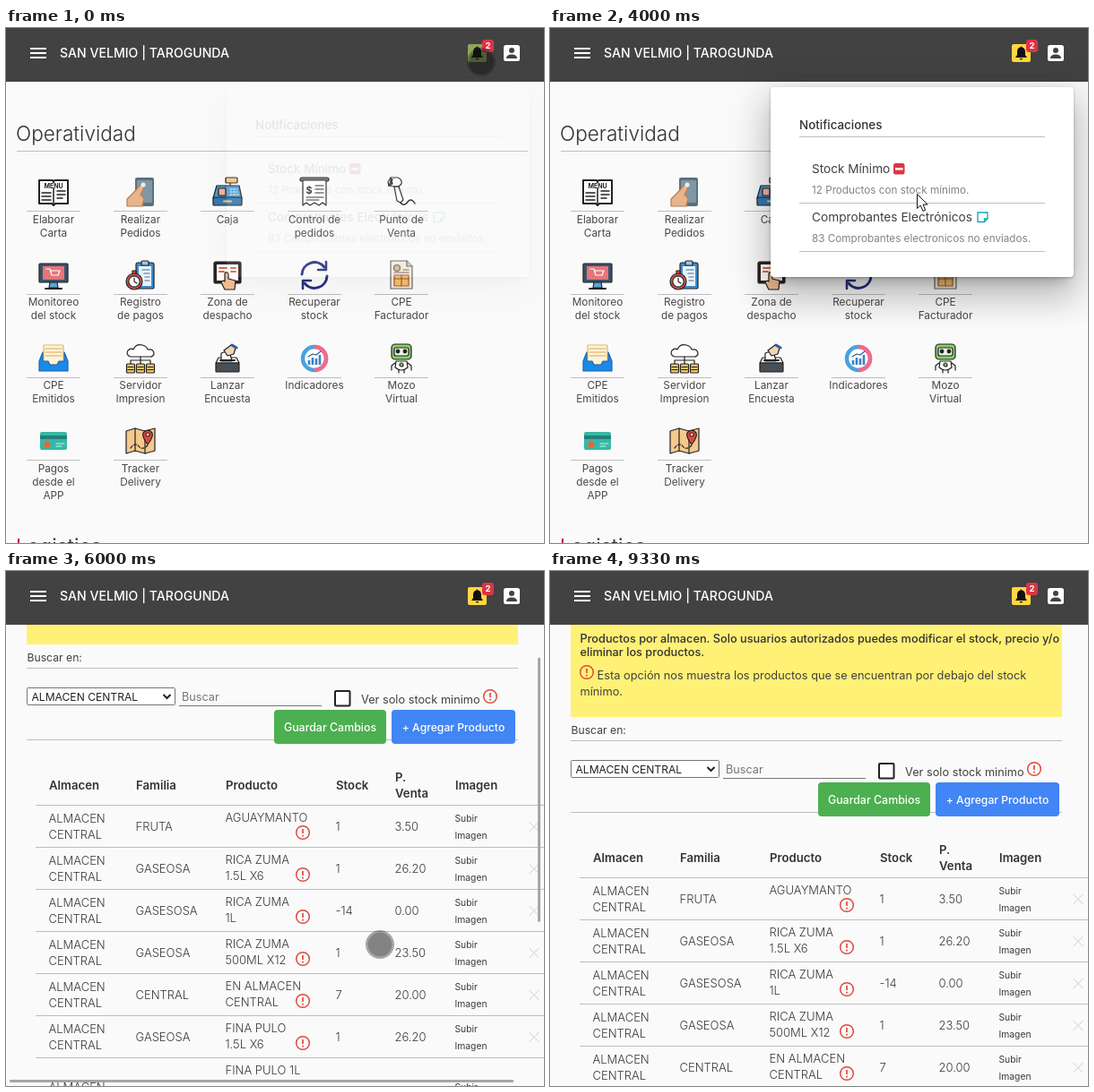
Recreate the animation shown at these times as an HTML page. Size 600 by 575 pixels, loop 9.39 s.

```html
<!DOCTYPE html>
<html lang="es">
<head>
<meta charset="utf-8">
<title>Notificaciones de stock</title>
<style>
  html, body { margin: 0; width: 100%; height: 100%; overflow: hidden; background: #fafafa; }
  svg { display: block; }
  text { font-family: Inter, Roboto, sans-serif; stroke: none; white-space: pre; }
  .icon { stroke: #222; stroke-width: 1.2; stroke-linejoin: round; stroke-linecap: round; }
</style>
</head>
<body>
<svg id="stage" width="600" height="575" viewBox="0 0 600 575"></svg>
<script>
const LOOP = 9390, STEP = 1000 / 15;

// Markup helpers
const text = (x, mid, str, size, fill = '#404040', weight = 400, anchor = 'start') =>
  `<text x="${x}" y="${mid + size * .36}" font-size="${size}" fill="${fill}" font-weight="${weight}" text-anchor="${anchor}">${str}</text>`;
const rect = (x, y, w, h, fill, rx = 0, extra = '') =>
  `<rect x="${x}" y="${y}" width="${w}" height="${h}" fill="${fill}" rx="${rx}" ${extra}/>`;
const circ = (x, y, r, fill, extra = '') => `<circle cx="${x}" cy="${y}" r="${r}" fill="${fill}" ${extra}/>`;
const path = (d, fill = 'none', extra = '') => `<path d="${d}" fill="${fill}" ${extra}/>`;
const rule = (x1, x2, y, color = '#bdbdbd') => rect(x1, y, x2 - x1, 1, color);
const group = (id, body) => `<g id="${id}">${body}</g>`;
const at = (x, y, body, cls = '') => `<g transform="translate(${x} ${y})" class="${cls}">${body}</g>`;
const plain = 'stroke="none"';
const alertIcon = (x, y) => at(x, y,
  circ(0, 0, 7.3, 'none', 'stroke="#e0483e" stroke-width="1.5"') +
  path('M0-4V1M0 2.8V4.4', 'none', 'stroke="#e0483e" stroke-width="1.7"'));

// Home icons, drawn around their own centre
const server = x => rect(x - 4.5, 6, 9, 10, '#e9c46a', 1) + path(`M${x - 3} 9.5h6M${x - 3} 12.5h6`);
const icons = {
  menu: path('M-16-13H-2Q0-13 0-11Q0-13 2-13H16V13H2L0 15L-2 13H-16Z', '#fff', 'stroke-width="2"') +
    path('M0-4V14M-13 1H-3M-13 5H-3M-13 9H-3M4-1h9M4 3h9M4 7h6', 'none', 'stroke-width="1.5"') +
    text(0, -7, 'MENU', 7, '#222', 700, 'middle'),
  phone: rect(-6, -16, 21, 32, '#5d6f7e', 2, plain) + rect(-4, -13, 17, 25, '#7f97a6', 0, plain) +
    path('M-15 8L-5-2Q0-9 2-8Q5-6 3-3L0 3L4 7L2 16H-15Z', '#e9b48c', 'stroke="#b77d58"') +
    circ(3, -8, 2.6, '#e7eef2', plain),
  register: rect(-2, -16, 13, 6, '#f2c879', 1) + path('M3-10V-6') +
    path('M-12-7H13L16 7H-16Z', '#4d9bd5') + rect(-16, 6, 32, 9, '#3878ae', 1) +
    rect(-10, -4, 8, 8, '#f3b2a0') + path('M3-3h8M3 0h8M3 3h9', 'none', 'stroke="#fff" stroke-dasharray="2 1.6"') +
    path('M-4 10.5H4', 'none', 'stroke="#f2c879" stroke-width="2"'),
  receipt: rect(-16, -16, 32, 4, '#777', 2) +
    path('M-13-13H13V15L9 12L5 15L0 12L-5 15L-9 12L-13 15Z', '#fff') +
    path('M1-7H10M1-3H10M1 1H10M-9 6H10M-9 9H5') + text(-6, -2, '$', 11, '#222', 600, 'middle'),
  scanner: path('M-15-11L-12-16H-4Q1-14 0-9L-3-6L2 9L-1 12L-5 10L-8-6L-14-7Z', '#fff') +
    path('M-14-7L-10-14M-8-6L-3-6M-1 12Q3 17 7 11Q11 6 15 13', 'none', 'stroke-width="1.5"') +
    path('M-12-16L-10-9L-14-7', '#444'),
  monitor: rect(-16, -13, 32, 21, '#38536b', 1) + rect(-12, -10, 24, 15, '#e8747a', 0, plain) +
    path('M-8-7h4l2 7h7l2-5h-10', 'none', 'stroke="#fff"') +
    path('M-4 8H4L5 14H-5Z', '#5ba5d5') + path('M-9 15H9', 'none', 'stroke-width="2"'),
  payments: rect(-5, -14, 20, 29, '#3e8cd0', 2) + rect(-2, -10, 14, 22, '#eaf3fa', 0, plain) +
    rect(1, -16, 8, 5, '#9cc7e8', 1) + path('M2-6h8M4-2h6M5 2h5M5 6h5', 'none', 'stroke="#3e6f9c"') +
    rect(-9, -5, 4, 4, '#d84f4f') + circ(-7, 7, 9, '#d84f4f') + circ(-7, 7, 6.2, '#fff') + path('M-7 3V7l3 2'),
  tablet: rect(-15, -15, 30, 24, '#2d2424', 2) + rect(-12, -12, 24, 18, '#fff', 0, plain) +
    path('M-9-8h8M-9-4h5M4-8h5M4-4h5', 'none', 'stroke="#d46b3a" stroke-width="2"') +
    path('M-3-2Q0-5 1-1V4L9 6L8 16H-3L-7 8Q-6 5-3 7Z', '#f3bd91'),
  refresh: path('M-14-1A14 14 0 0 1 11-9M14 1A14 14 0 0 1-11 9', 'none', 'stroke="#27307f" stroke-width="3"') +
    path('M13-15V-6H4M-13 15V6H-4', 'none', 'stroke="#27307f" stroke-width="2.5"'),
  invoice: path('M-12-16H6L12-10V15H-12Z', '#f3e9d5', 'stroke="#666"') + path('M6-16V-10H12', '#d9cbb0', 'stroke="#666"') +
    rect(-8, 0, 16, 12, '#f0c06a', 0, 'stroke="#a8553a"') + path('M-8 4H8M0 0V12', 'none', 'stroke="#a8553a"') +
    circ(-5, -8, 3.5, '#c9b9a0', 'stroke="#666"') + path('M2-6h6M-8-3H8', 'none', 'stroke="#666"'),
  tray: rect(-11, -15, 22, 22, '#fff4d8', 1, 'stroke="#d4b878"') +
    path('M-9-11H9M-9-7H9M-9-3H9', 'none', 'stroke="#d9a74f"') +
    path('M-12-7L-16 3V14H16V3L12-7V3H6L4 7H-4L-6 3H-12Z', '#1e88e5', 'stroke="#1769b5"'),
  cloud: path('M-11-2Q-17-4-14-9Q-11-12-8-10Q-5-17 2-15Q7-14 8-10Q15-11 15-5Q14-2 11-2Z', '#fff') +
    path('M0-2V6M-11 6V2H11V6') + server(-11) + server(0) + server(11),
  ballot: path('M-13 5L-10-1H10L13 5Z', '#fff') + rect(-13, 5, 26, 10, '#4a4f55', 1) +
    path('M-7 3V-6L2-9L5 3Z', '#fff') + path('M-4-9L4-15L9-12L7-5L0-3Z', '#f2d3b5') +
    path('M-8 2H8', 'none', 'stroke-width="2"') + path('M5-15L10-12', 'none', 'stroke="#2f5f94" stroke-width="3"'),
  gauge: circ(0, 0, 13, '#fff', 'stroke="#4aa3dc" stroke-width="4.5"') +
    path('M0-13A13 13 0 0 1 0 13', 'none', 'stroke="#f46a86" stroke-width="4.5" stroke-linecap="butt"') +
    path('M-6 7V2M-2 7V-1M2 7V0M6 7V-4', 'none', 'stroke="#3b82c4" stroke-width="2.6" stroke-linecap="butt"') +
    path('M-7-2L-2-5L2-4L7-8', 'none', 'stroke="#2b5c96"'),
  robot: path('M-6 3H6L7 10Q0 16-7 10Z', '#fff') + rect(-11, -16, 22, 17, '#86cf68', 4) +
    rect(-8, -12, 16, 9, '#e6f5dd', 2) + circ(-4, -8, 1.8, '#222') + circ(4, -8, 1.8, '#222') +
    path('M-7 5L-11 8V13M7 5L11 8V13M-3 13V16M3 13V16') + circ(0, 7, 2, '#86cf68'),
  pay: rect(-15, -10, 30, 20, '#35b9a6', 2, plain) + rect(-15, -6, 30, 4, '#267f7a', 0, plain) +
    circ(-7, 4, 3.5, '#e8643c', plain) + path('M3 3h9M3 6h6', 'none', 'stroke="#d8f3ec"'),
  map: path('M-16-11L-6-14L5-11L16-14V11L5 14L-6 11L-16 14Z', '#f5c98c') + path('M-6-14V11M5-11V14') +
    path('M-11 8Q-6 1-2 6T8 5', 'none', 'stroke-dasharray="3 2"') +
    path('M8 4Q1-5 3-9Q8-15 13-9Q15-5 8 4Z', '#e0483e') + circ(8, -7, 2, '#fff')
};
const menu = [
  ['menu', 'Elaborar|Carta'], ['phone', 'Realizar|Pedidos'], ['register', 'Caja'], ['receipt', 'Control de|pedidos'], ['scanner', 'Punto de|Venta'],
  ['monitor', 'Monitoreo|del stock'], ['payments', 'Registro|de pagos'], ['tablet', 'Zona de|despacho'], ['refresh', 'Recuperar|stock'], ['invoice', 'CPE|Facturador'],
  ['tray', 'CPE|Emitidos'], ['cloud', 'Servidor|Impresion'], ['ballot', 'Lanzar|Encuesta'], ['gauge', 'Indicadores'], ['robot', 'Mozo|Virtual'],
  ['pay', 'Pagos|desde el|APP'], ['map', 'Tracker|Delivery']
];

const home = text(11, 118, 'Operatividad', 22.6, '#333', 300) + rule(12, 582, 137) +
  menu.map(([icon, label], i) => {
    const x = 53 + i % 5 * 97, y = 183.3 + Math.floor(i / 5) * 92.7;
    return at(x, Math.round(y), icons[icon], 'icon') + rule(x - 30, x + 30, Math.round(y + 21)) +
      label.split('|').map((line, k) => text(x, y + 30 + k * 15, line, 11.8, '#484848', 400, 'middle')).join('');
  }).join('') +
  text(11, 578.5, '<tspan fill="#c2185b">L</tspan>ogistica', 22.6, '#333');

// One layer of the card's elevation shadow
const shadow = (dy, blur, spread, alpha) => rect(246 - spread, 66 + dy - spread, 338 + 2 * spread, 212 + 2 * spread,
  '#000', 4, `opacity="${alpha}" style="filter:blur(${blur / 2}px)"`);

const popup = shadow(24, 38, 3, .14) + shadow(9, 46, 8, .12) + shadow(11, 15, -7, .2) + shadow(1, 3, 0, .25) +
  rect(246, 66, 338, 212, '#fff', 4) +
  text(278, 108, 'Notificaciones', 13.4, '#333', 500) + rule(278, 552, 121) +
  text(292, 157, 'Stock Mínimo', 13.6) + rect(383, 151, 12.5, 12.5, '#dc3545', 2.5) + rect(385, 156, 8.5, 2.6, '#fff') +
  text(292, 181, '12 Productos con stock mínimo.', 11.7, '#808488') + rule(278, 552, 195) +
  text(292, 211, 'Comprobantes Electrónicos', 13.7) +
  path('M477 206H488V213L484.500 216.500H477ZM488 213H484.500V216.500', 'none', 'stroke="#17a2b8" stroke-width="1.3"') +
  text(292, 235, '83 Comprobantes electronicos no enviados.', 11.7, '#808488') + rule(278, 552, 249);

// Stock page
const tableHead = (cols, end) => ['Almacen', 'Familia', 'Producto', 'Stock', 'P.', 'Imagen']
  .map((name, i) => text(cols[i], name === 'P.' ? 411 : 420, name, 13.2, '#333', 600)).join('') +
  text(cols[4], 429, 'Venta', 13.2, '#333', 600) + rule(33, end, 442);

const products = [
  ['FRUTA', 'AGUAYMANTO', '1', '3.50'],
  ['GASEOSA', 'RICA ZUMA|1.5L X6', '1', '26.20'],
  ['GASESOSA', 'RICA ZUMA|1L', '-14', '0.00'],
  ['GASEOSA', 'RICA ZUMA|500ML X12', '1', '23.50'],
  ['CENTRAL', 'EN ALMACEN|CENTRAL', '7', '20.00'],
  ['GASEOSA', 'FINA PULO|1.5L X6', '1', '26.20'],
  ['GASEOSA', 'FINA PULO 1L|-|RETORNABLE', '1', '24.60', 83],
  ['GASEOSA', 'FINA PULO DE|500ML X12', '1', '23.50'],
  ['FRUTA', 'UVA VERDE', '1', '3.00', 44]
];
let rowTop = 442;
const rows = products.map(([family, name, stock, price, height = 47]) => {
  const top = rowTop, mid = top + height / 2 + .5;
  const cell = (x, y, str, size = 13) => text(x - .5, y, str, size, '#3a3a3a', size < 12 ? 400 : 300);
  rowTop += height;
  return cell(48, mid - 9, 'ALMACEN') + cell(48, mid + 9, 'CENTRAL') + cell(145, mid + .5, family) +
    name.split('|').map((line, k) => cell(245, (height === 44 ? mid - 1 : top + 14) + k * 18, line)).join('') +
    alertIcon(331, height === 83 ? top + 67 : height === 44 ? mid - 1 : top + 31) +
    cell(368, mid + .5, stock) + cell(434, mid + .5, price) +
    cell(501, mid - 9, 'Subir', 10.3) + cell(501, mid + 10, 'Imagen', 10.3) +
    path(`M583.500 ${mid - 5}l11 11m0-11l-11 11`, 'none', 'stroke="#e0e0e0" stroke-width="1.2"') +
    rule(33, 600, rowTop);
}).join('');

const stockPage = text(118.5, 102, 'PRODUCTOS', 13.2) + text(394.5, 102, 'PORCIONES', 13.2, '#555') +
  rule(23, 571, 126, '#b0b0b0') + rect(23, 124.5, 274, 2, '#f4ee55') +
  rect(23, 150, 548, 113, '#fff176') +
  text(33.5, 175, 'Productos por almacen. Solo usuarios autorizados puedes modificar el stock, precio y/o', 12.75, '#333', 500) +
  text(33.5, 190, 'eliminar los productos.', 12.75, '#333', 500) + alertIcon(41, 213) +
  text(52.5, 216, 'Esta opción nos muestra los productos que se encuentran por debajo del stock', 12.8) +
  text(33.5, 234, 'mínimo.', 12.8) +
  text(23.5, 278, 'Buscar en:', 12.2) + rule(23, 571, 289) +
  rect(23.5, 311.5, 165, 19, '#fff', 1, 'stroke="#767676"') + text(28.5, 321.5, 'ALMACEN CENTRAL', 12.1, '#222') +
  path('M175.500 319l4 4l4-4', 'none', 'stroke="#222" stroke-width="2"') +
  text(196, 321, 'Buscar', 12.7, '#777') + rule(193, 352, 331, '#777') +
  rect(367, 315, 16.500, 16.500, '#fff', 1, 'stroke="#222" stroke-width="2"') +
  text(396, 324, 'Ver solo stock minimo', 12.75) + alertIcon(540, 321) + rule(23, 571, 369) +
  rect(299, 336, 125, 38, '#4caf50', 4) + text(361.5, 355.5, 'Guardar Cambios', 12.4, '#fff', 500, 'middle') +
  rect(430, 336, 138, 38, '#4285f4', 4) + text(499, 355.5, '+ Agregar Producto', 12.2, '#fff', 500, 'middle') +
  group('emptyHead', tableHead([48, 148, 247, 336, 402, 469], 560)) +
  group('table', tableHead([48, 145, 245, 368, 434, 501], 600) + rows);

const header = rect(0, 0, 600, 60, '#424242') +
  [22, 27, 32].map(y => rect(27, y, 18, 2, '#fff')).join('') +
  text(60, 28, 'SAN VELMIO | TAROGUNDA', 14.1, '#fff', 500) +
  rect(515, 18, 21, 20, '#ffd740', 2, 'id="bellBox"') +
  group('bell', path('M-6.500 5L-4.500 2V-2Q-4-6-1-6.500Q0-8.500 1-6.500Q4-6 4.500-2V2L6.500 5ZM-2 6H2Q0 9-2 6Z', '#111')) +
  rect(531, 13, 13, 14, '#dc3545', 3) + text(537.5, 20, '2', 9.5, '#fff', 700, 'middle') +
  rect(555, 19, 18, 18, '#fff', 2.5) + circ(564, 25, 3, '#424242') + path('M558 34Q558 29.500 564 29.500T570 34Z', '#424242');

document.getElementById('stage').innerHTML = rect(0, 0, 600, 575, '#fafafa') +
  group('home', home) + group('stock', stockPage) + header + group('popup', popup) +
  group('bars', rect(593, 0, 3, 295, '#a6a6a6', 1, 'id="vBar"') + rect(4, 568, 562, 3, '#a6a6a6', 1)) +
  rect(0, 0, 600, 575, '#000', 0, 'id="shade"') +
  group('loader', rect(292, 281, 16, 13, '#fff', 1) + circ(298, 286, .6, '#666') + circ(302, 286, .6, '#666')) +
  group('press', circ(0, 0, 16, '#000', 'opacity=".3"') + circ(0, 0, 13.5, '#222', 'opacity=".3"') +
    circ(0, 0, 15, 'none', 'stroke="#777" stroke-dasharray="1.5 1.5" opacity=".5"')) +
  group('arrow', path('M0 0V16L3.700 12.600L6.500 19L9.200 17.800L6.500 11.600H11.500Z', '#fff', 'stroke="#111"'));

const el = Object.fromEntries([...document.querySelectorAll('[id]')].map(node => [node.id, node]));

// Piecewise eased track over keys of [time, ...values]
function track(keys, t) {
  const next = keys.findIndex(key => key[0] > t);
  if (next === 0) return keys[0].slice(1);
  if (next < 0) return keys[keys.length - 1].slice(1);
  const a = keys[next - 1], b = keys[next], u = (t - a[0]) / (b[0] - a[0]), e = u * u * (3 - 2 * u);
  return a.slice(1).map((v, i) => v + (b[i + 1] - v) * e);
}
const pointer = [[0, 530, 38], [930, 530, 38], [1734, 346, 169], [1870, 355, 174], [2400, 425, 200], [2800, 380, 196],
  [3300, 344, 216], [4000, 409, 185], [4530, 384, 180], [5000, 384, 180], [5450, 417, 560], [6000, 417, 417],
  [6250, 412, 330], [7400, 359, 351], [7470, 362, 360], [7870, 366, 510], [8400, 420, 600]];
const scrolling = [[5450, 0], [6000, 181], [6450, 300], [7470, 300], [8000, 100]];
const popupFade = [[0, .1], [70, .42], [134, .75], [200, .96], [900, .96], [930, 1], [4600, 1], [4800, 0]];
const shadeFade = [[4860, .1], [4930, .35], [5000, .45], [5270, .45], [5470, 0]];
const barFade = [[5440, 0], [5500, 1], [6900, 1], [7300, 0], [7460, 0], [7530, 1], [8400, 1], [8780, 0]];
const presses = [[-1, 190], [4600, 4990], [5440, 6250], [7460, 7900]];

const show = (node, on) => node.setAttribute('display', on ? 'inline' : 'none');
const move = (node, x, y, turn = 0) =>
  node.setAttribute('transform', `translate(${x.toFixed(2)} ${y.toFixed(2)}) rotate(${turn})`);

function draw(ms) {
  const t = Math.floor((ms + 4) / STEP) * STEP + .5;
  const [x, y] = track(pointer, t), [scroll] = track(scrolling, t), [shade] = track(shadeFade, t);
  const pressed = presses.some(([from, to]) => t >= from && t < to);
  const onStock = t >= 4860, loaded = t >= 5300;

  show(el.home, !onStock);
  show(el.stock, onStock);
  show(el.emptyHead, !loaded);
  show(el.table, loaded);
  move(el.stock, 0, -Math.round(scroll));
  show(el.popup, !onStock);
  el.popup.setAttribute('opacity', track(popupFade, t)[0]);
  el.bars.setAttribute('opacity', track(barFade, t)[0]);
  el.vBar.setAttribute('y', 4 + scroll * .513);
  el.shade.setAttribute('opacity', onStock ? shade : 0);
  show(el.loader, onStock && t < 5400);

  const swing = t < 900 ? 0 : 10 * Math.sin(Math.PI * t / (2 * STEP));
  move(el.bell, 525.5, 28, swing.toFixed(2));
  el.bellBox.setAttribute('fill', t < 60 ? '#8fa65a' : '#ffd740');

  show(el.press, pressed);
  show(el.arrow, !pressed);
  move(el.press, x, y);
  move(el.arrow, x + .5, y + .5);
}

const start = performance.now();
function tick() {
  draw((performance.now() - start) % LOOP);
  requestAnimationFrame(tick);
}
draw(0);
requestAnimationFrame(tick);
</script>
</body>
</html>
```
